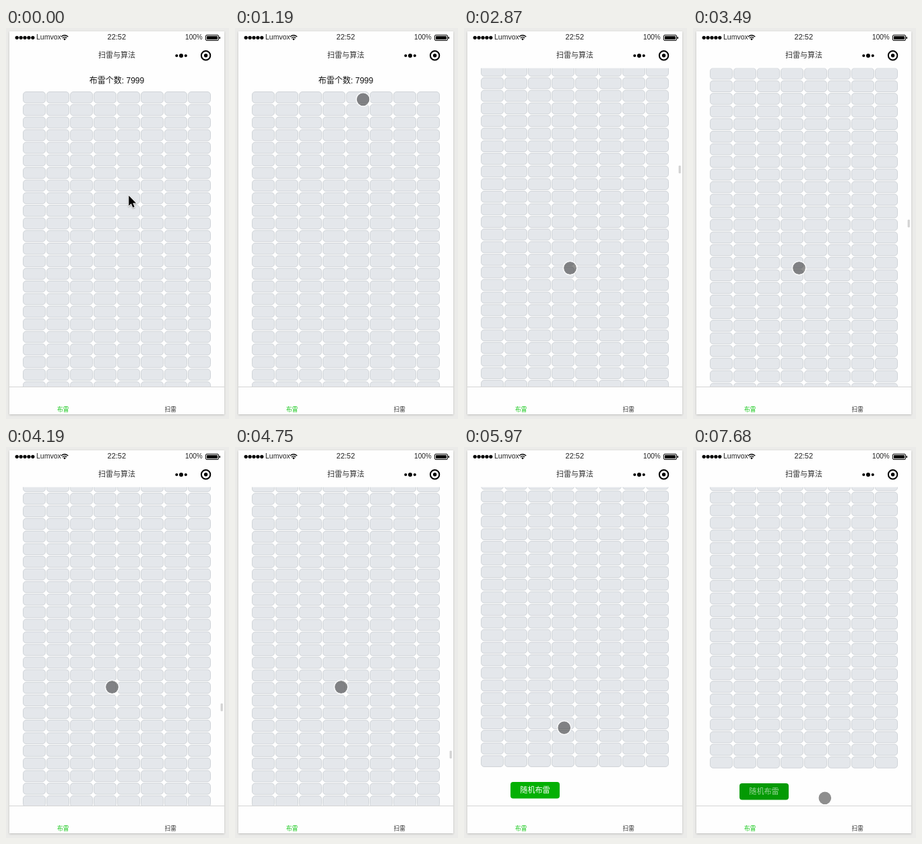
An HTML page with a canvas that plays this animation: 331x579 px, repeating every 8 s.

```html
<!DOCTYPE html>
<html lang="zh-CN">
<head>
<meta charset="utf-8">
<style>
html, body { margin: 0; width: 100%; height: 100%; overflow: hidden; background: #ebebe9; }
canvas { display: block; }
</style>
</head>
<body>
<canvas id="stage" width="331" height="579"></canvas>
<script>
const ctx = document.getElementById('stage').getContext('2d');
const LOOP = 8000;
const TOP = 59.5, BOTTOM = 531;
const ROWS = 1000, COLS = 8, PITCH_X = 35.07, PITCH_Y = 18.667, GRID_Y = 94;
const SCROLL_STEP = 60, SCROLL_PHASE = 20, SCROLL_END = 5180, MAX_SCROLL = 18284;
const FONT = '"Liberation Sans", "Noto Sans CJK SC", "Noto Sans CJK", sans-serif';

// [time, scroll offset]
const scrollKeys = [[1740, 0], [1940, 1101], [2840, 5789], [4160, 12925], [SCROLL_END, MAX_SCROLL]];
// [time, x, y]
const touchKeys = [
  [750, 185, 252], [1110, 194, 76], [1510, 157.5, 355.5], [5880, 157.5, 355.5],
  [5970, 148.7, 415.7], [6290, 112, 514.5], [7450, 112, 514.5], [7670, 195.8, 519.8]
];

const ease = u => u * u * (3 - 2 * u);

function track(keys, t, curve = u => u) {
  if (t <= keys[0][0]) return keys[0].slice(1);
  for (let i = 1; i < keys.length; i++) {
    const a = keys[i - 1], b = keys[i];
    if (t < b[0]) {
      const u = curve((t - a[0]) / (b[0] - a[0]));
      return a.slice(1).map((v, k) => v + (b[k + 1] - v) * u);
    }
  }
  return keys[keys.length - 1].slice(1);
}

// The list advances in visible steps, then overshoots and settles.
function scrollAt(time) {
  const t = Math.floor((time - SCROLL_PHASE) / SCROLL_STEP) * SCROLL_STEP + SCROLL_PHASE;
  if (t < SCROLL_END) return track(scrollKeys, t)[0];
  if (t > 6300) return MAX_SCROLL;
  const bounce = 14.3 * Math.exp((5300 - t) / 325) * (1 - Math.exp((SCROLL_END - t) / 30));
  return MAX_SCROLL + bounce;
}

function text(str, x, y, size, color, align = 'center') {
  ctx.font = `${size}px ${FONT}`;
  ctx.textAlign = align;
  ctx.fillStyle = color;
  ctx.fillText(str, x, y);
}

function dot(x, y, r, color) {
  ctx.fillStyle = color;
  ctx.beginPath();
  ctx.arc(x, y, r, 0, 7);
  ctx.fill();
}

function box(x, y, w, h, r, color) {
  ctx.fillStyle = color;
  ctx.beginPath();
  ctx.roundRect(x, y, w, h, r);
  ctx.fill();
}

function drawPhone() {
  ctx.fillStyle = '#ebebe9';
  ctx.fillRect(0, 0, 331, 579);
  ctx.save();
  ctx.shadowColor = 'rgba(0,0,0,.2)';
  ctx.shadowBlur = 3;
  ctx.shadowOffsetY = 1;
  ctx.fillStyle = '#fefefe';
  ctx.fillRect(5, 5, 319, 567);
  ctx.restore();
}

function drawStatusBar() {
  for (let i = 0; i < 5; i++) dot(16.2 + i * 5.9, 14.3, 2.6, '#000');
  text('Lumvox', 45, 17, 10.5, '#222', 'left');
  ctx.strokeStyle = '#000';
  ctx.lineWidth = 1.4;
  for (const r of [4, 6.8]) {
    ctx.beginPath();
    ctx.arc(87, 17.6, r, -Math.PI * .77, -Math.PI * .23);
    ctx.stroke();
  }
  dot(87, 16.6, 1.4, '#000');
  text('22:52', 164.3, 17, 11, '#222');
  text('100%', 291.7, 17, 10, '#222', 'right');
  ctx.lineWidth = 1;
  ctx.beginPath();
  ctx.roundRect(296.5, 10.5, 19, 8, 1.5);
  ctx.stroke();
  box(298, 12, 16, 5, .5, '#000');
  box(316.5, 13, 1.5, 3, .5, '#000');
}

function drawHeader() {
  text('扫雷与算法', 164.5, 44.3, 11, '#333');
  dot(253.3, 41, 2.1, '#000');
  dot(260, 41, 3, '#000');
  dot(266.8, 41, 2.1, '#000');
  ctx.strokeStyle = '#000';
  ctx.lineWidth = 2;
  ctx.beginPath();
  ctx.arc(296.6, 40.7, 6.7, 0, 7);
  ctx.stroke();
  dot(296.6, 40.7, 2.7, '#000');
}

function drawContent(t) {
  const scroll = scrollAt(t);
  ctx.save();
  ctx.beginPath();
  ctx.rect(5, TOP, 319, BOTTOM - TOP);
  ctx.clip();
  text('布雷个数: 7999', 164.5, 82.3 - scroll, 12, '#111');

  const first = Math.max(0, Math.floor((scroll - GRID_Y + TOP) / PITCH_Y) - 1);
  ctx.strokeStyle = '#d0d4d8';
  ctx.lineWidth = 1;
  for (let row = first; row < Math.min(first + 28, ROWS); row++) {
    for (let col = 0; col < COLS; col++) {
      const x = Math.round(25 + col * PITCH_X) + .5;
      box(x, GRID_Y + .5 + row * PITCH_Y - scroll, 33, 16.5, 4.5, '#e4e7eb');
      ctx.stroke();
    }
  }

  const pressed = t >= 6700;
  const buttonY = MAX_SCROLL + 498 - scroll;
  box(69, buttonY, 73, 24.5, 4, pressed ? '#049a04' : '#04b004');
  text('随机布雷', 105.5, buttonY + 16.3, 11.1, pressed ? 'rgba(255,255,255,.6)' : '#fff');

  if (t >= 1750 && t < 5860) {
    ctx.globalAlpha = Math.min(1, (5860 - t) / 200);
    box(318.6, 61 + Math.min(1, scroll / MAX_SCROLL) * 451, 3.2, 11.5, 1, '#d3d3d3');
  }
  ctx.restore();
}

function drawTabs() {
  ctx.fillStyle = '#d4d4d4';
  ctx.fillRect(5, BOTTOM, 319, 1);
  text('布雷', 84.7, 568, 8.6, '#1ac81f');
  text('扫雷', 244.2, 568, 8.6, '#333');
}

function drawArrow() {
  const arrow = new Path2D('M0 0V15L3.5 11.8L6 17.5L8.4 16.5L6 11H10.8Z');
  ctx.save();
  ctx.translate(182.3, 248.3);
  ctx.shadowColor = 'rgba(0,0,0,.35)';
  ctx.shadowBlur = 2;
  ctx.shadowOffsetY = 1;
  ctx.fillStyle = '#000';
  ctx.strokeStyle = '#fff';
  ctx.lineWidth = 1.6;
  ctx.stroke(arrow);
  ctx.shadowColor = 'transparent';
  ctx.fill(arrow);
  ctx.restore();
}

function drawTouch(t) {
  const [x, y] = track(touchKeys, t, ease);
  dot(x, y, 9.5, 'rgba(0,0,0,.44)');
  ctx.strokeStyle = 'rgba(255,255,255,.75)';
  ctx.lineWidth = 1.4;
  ctx.beginPath();
  ctx.arc(x, y, 10.1, 0, 7);
  ctx.stroke();
}

function frame(now) {
  const t = now % LOOP;
  drawPhone();
  drawStatusBar();
  drawHeader();
  drawContent(t);
  drawTabs();
  if (t < 750) drawArrow();
  else drawTouch(t);
  requestAnimationFrame(frame);
}
requestAnimationFrame(frame);
</script>
</body>
</html>
```
